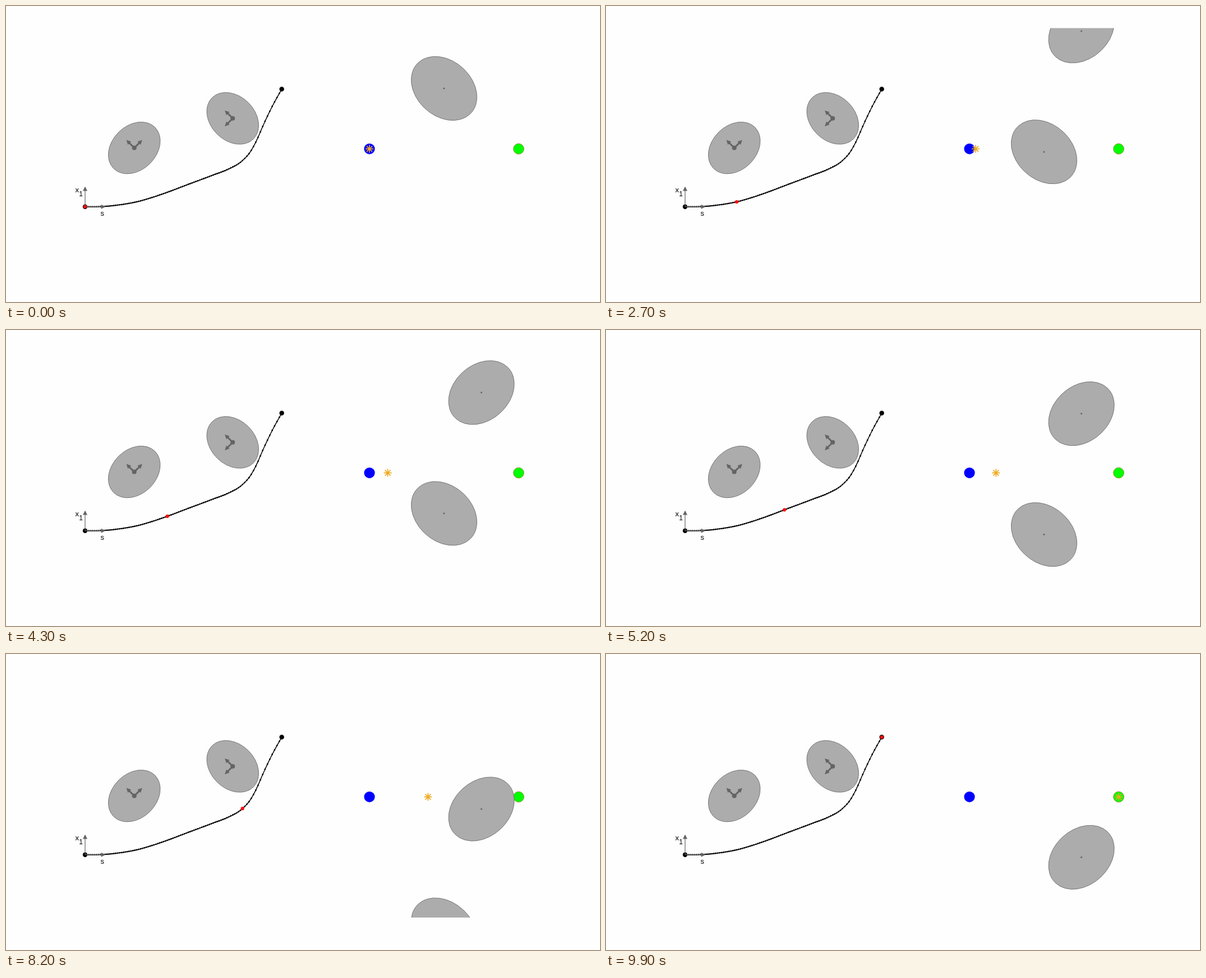
Animation of 1059x529 px, one loop 10 s. Source, as an HTML page:

```html
<!DOCTYPE html>
<html lang="en">
<head>
<meta charset="utf-8">
<title>Path around moving obstacles</title>
<style>
  html, body { margin: 0; width: 100%; height: 100%; overflow: hidden; background: #fefefe; }
  svg { display: block; width: 100%; height: 100%; }
  text { font: 13px "Liberation Sans", Arial, sans-serif; }
  .blob { fill: #acacac; stroke: #6c6c6c; stroke-width: .9; vector-effect: non-scaling-stroke; }
  .mark { fill: #646464; }
  .axis { stroke: #646464; stroke-width: 1.2; }
  .frame { stroke: #646464; stroke-width: 3; }
</style>
</head>
<body>
<svg viewBox="0 0 1059 529">
  <defs>
    <clipPath id="view"><rect x="560" y="39.5" width="440" height="431.5"/></clipPath>
    <ellipse id="blob" class="blob" rx="52.1" ry="39.6"/>
    <path id="head" class="mark" d="M0 0L-8 -4V4Z"/>
    <g id="axes">
      <g transform="rotate(-45)"><path class="frame" d="M0 0H14"/><use href="#head" x="20"/></g>
      <g transform="rotate(-135)"><path class="frame" d="M0 0H14"/><use href="#head" x="20"/></g>
      <circle class="mark" r="4"/>
    </g>
  </defs>

  <g transform="translate(228.7 253.6)"><use href="#blob" transform="rotate(-45)"/><use href="#axes"/></g>
  <g transform="translate(404.2 200.8)"><use href="#blob" transform="rotate(45)"/><use href="#axes" transform="rotate(-90)"/></g>

  <path id="line" fill="none" stroke="#000" stroke-width="1.5"/>
  <path id="dots" fill="none" stroke="#000" stroke-width="2.8" stroke-linecap="round"/>
  <circle cx="141" cy="358.7" r="4.2"/>
  <circle cx="491.6" cy="148.5" r="4.2"/>
  <path class="axis" d="M141 358.7V328M141 358.7H172"/>
  <use href="#head" transform="translate(141 322.5) rotate(-90)"/>
  <use href="#head" x="177.5" y="358.7"/>
  <text x="123.6" y="333">x</text>
  <text x="130.2" y="340" style="font-size:12px">1</text>
  <text x="168.6" y="374.6">s</text>
  <circle id="red" r="3.1" fill="#ff0d0d"/>

  <circle cx="648" cy="255.3" r="9.6" fill="#00f"/>
  <circle cx="914" cy="255.3" r="9.4" fill="#0f0" stroke="#a08030" stroke-width=".9"/>
  <g clip-path="url(#view)">
    <g id="first"><use href="#blob" transform="scale(1.266 1.234) rotate(45)"/><circle class="mark" r="1.5"/></g>
    <g id="second"><use href="#blob" transform="scale(1.266 1.234) rotate(-45)"/><circle class="mark" r="1.5"/></g>
  </g>
  <path id="star" d="M-7 0H7M0 -7V7M-5 -5L5 5M-5 5L5 -5" stroke="#edab20" stroke-width="1.7"/>
</svg>
<script>
const STEPS = 100, STEP_MS = 100;
const START = { x: 141, y: 358.7 }, SPAN = { x: 350.6, y: 210.2 };

// Smooth curve through knots [u, v], with parabolic tangents.
function curve(knots) {
  const last = knots.length - 1;
  const slope = i => (knots[i + 1][1] - knots[i][1]) / (knots[i + 1][0] - knots[i][0]);
  const tangent = i => {
    if (i === 0) return slope(0);
    if (i === last) return slope(last - 1);
    const before = knots[i][0] - knots[i - 1][0], after = knots[i + 1][0] - knots[i][0];
    return (slope(i - 1) * after + slope(i) * before) / (before + after);
  };
  return u => {
    let i = 0;
    while (i < last - 1 && u > knots[i + 1][0]) i++;
    const [u0, v0] = knots[i], [u1, v1] = knots[i + 1];
    const h = u1 - u0, t = (u - u0) / h, r = 1 - t;
    return v0 * r * r * (1 + 2 * t) + v1 * t * t * (3 - 2 * t)
      + h * t * r * (tangent(i) * r - tangent(i + 1) * t);
  };
}

const pathX = curve([[0, 141], [33, 253.5], [66, 366.1], [77, 404.2], [82, 421.6], [88, 445.3], [99, 491.6]]);
const pathY = curve([
  [141, 358.7], [175, 358.2], [205, 355], [233, 350], [262, 341.7], [288, 332.8], [318, 321.4],
  [369.5, 302], [396, 291.7], [421.5, 276.3], [436, 260], [445, 244], [460, 210], [474, 180.7], [491.6, 148.5]
]);
const points = Array.from({ length: STEPS }, (_, i) => {
  const x = pathX(i);
  return { x, y: pathY(x) };
});

const el = id => document.getElementById(id);
const move = (id, x, y) => el(id).setAttribute("transform", `translate(${x.toFixed(2)} ${y.toFixed(2)})`);
const pair = p => `${p.x.toFixed(2)} ${p.y.toFixed(2)}`;

el("line").setAttribute("d", "M" + points.map(pair).join("L"));
el("dots").setAttribute("d", points.map(p => `M${pair(p)}h0`).join(""));

function draw(step) {
  const p = points[step];
  const s = (p.x - START.x) / SPAN.x;
  const x1 = (START.y - p.y) / SPAN.y;
  move("red", p.x, p.y);
  move("star", 648 + 266 * x1, 255.3);
  move("first", 781, 255.3 + 432 * (s - .25));
  move("second", 847.6, 255.3 + 432 * (s - .75));
}

function tick() {
  draw(Math.floor(performance.now() / STEP_MS) % STEPS);
  requestAnimationFrame(tick);
}
tick();
</script>
</body>
</html>
```
